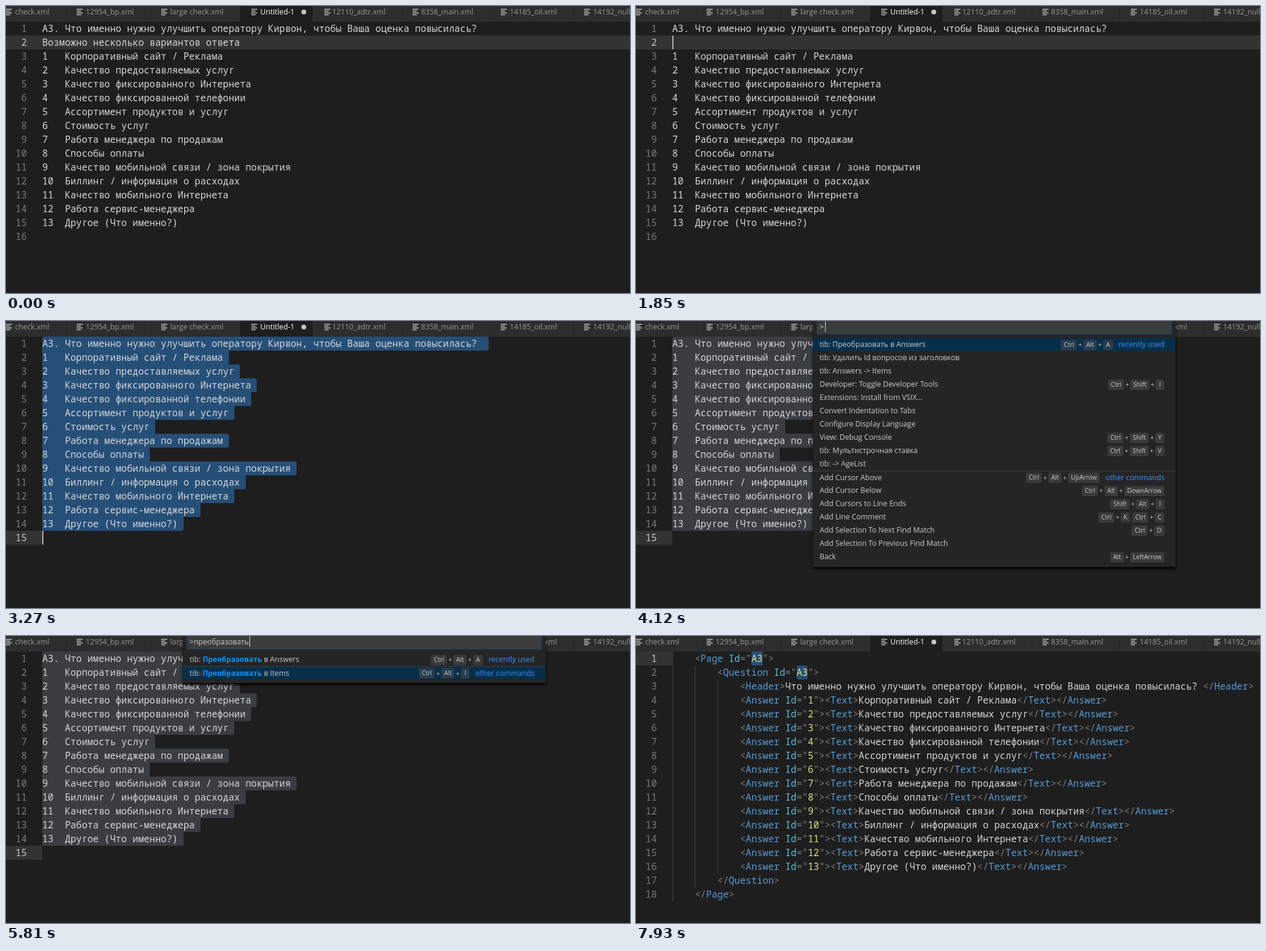
An HTML page for the animation above (8 s loop, 1033 by 476 pixels).

```html
<!DOCTYPE html>
<html lang="ru">
<head>
<meta charset="utf-8">
<style>
html, body { margin: 0; width: 100%; height: 100%; overflow: hidden; background: #1e1e1e; }
#stage { position: relative; width: 1033px; height: 476px; overflow: hidden;
  font: 12.25px/20px "Open Sans", "Noto Sans", sans-serif; color: #ccc; }
#stage div { position: absolute; box-sizing: border-box; white-space: pre; }
.line, .num { font: 15.583px/23px "Noto Sans Mono", "DejaVu Sans Mono", monospace; color: #d8d8d8; }
#stage .num { color: #7a7a7a; text-align: right; }
#stage .num.on { color: #c6c6c6; }
.p { color: #808080; } .t { color: #569cd6; } .a { color: #5cbcd8; } .v { color: #e2e284; }
#stage .tab { background: #2d2d2d; }
#stage .tab.on { background: #1e1e1e; }
svg { position: absolute; fill: none; stroke: #c0c0c0; stroke-width: 1.4; }
.palette { background: #252526; box-shadow: 0 3px 4px #000; }
.input { background: #3c3c3c; border: 1px solid #14476b; border-top: 0; }
#stage .row { left: 0; width: 600px; height: 22px; line-height: 22px; padding: 0 18px 0 11px;
  display: flex; align-items: center; }
.row.on { background: #062f4a; }
.row.split { border-top: 1px solid #3f3f46; }
.row b { color: #0097fb; }
.row span { flex: 1; }
.row em { font-style: normal; color: #3794ff; margin-left: 9px; }
.row i { font: 10.4px "Open Sans", sans-serif; margin: 0 2px; }
.row u { width: 3px; }
kbd { font: 10.4px/15px "Open Sans", "Noto Sans", sans-serif; padding: 0 4px; min-width: 5px; text-align: center;
  background: #3a3a3b; border: 1px solid #333; border-bottom-color: #444; border-radius: 3px; }
.row.on kbd { background: #263d4f; }
</style>
</head>
<body>
<div id="stage"></div>
<script type="module">
const X = 60, Y = 26, CW = 9.35, LH = 23;
const title = 'Что именно нужно улучшить оператору Кирвон, чтобы Ваша оценка повысилась? ';
const answers = ['Корпоративный сайт / Реклама', 'Качество предоставляемых услуг',
  'Качество фиксированного Интернета', 'Качество фиксированной телефонии',
  'Ассортимент продуктов и услуг', 'Стоимость услуг', 'Работа менеджера по продажам',
  'Способы оплаты', 'Качество мобильной связи / зона покрытия',
  'Биллинг / информация о расходах', 'Качество мобильного Интернета',
  'Работа сервис-менеджера', 'Другое (Что именно?)'];
const hint = 'Возможно несколько вариантов ответа';
const list = answers.map((a, i) => String(i + 1).padEnd(4) + a);
const head = 'A3. ' + title;
const fullDoc = [head, hint, ...list, ''];
const blankDoc = [head, '', ...list, ''];
const cleanDoc = [head, ...list, ''];

const esc = s => s.replace(/</g, '&lt;').replace(/>/g, '&gt;');
const tint = (cls, s) => `<span class="${cls}">${esc(s)}</span>`;
const openTag = (name, id) => tint('p', '<') + tint('t', name) +
  (id ? ' ' + tint('a', 'Id') + tint('p', '="') + tint('v', id) + tint('p', '"') : '') + tint('p', '>');
const closeTag = name => tint('p', '</') + tint('t', name) + tint('p', '>');
const indent = n => ' '.repeat(4 * n);
const xmlDoc = [
  indent(1) + openTag('Page', 'A3'),
  indent(2) + openTag('Question', 'A3'),
  indent(3) + openTag('Header') + title + closeTag('Header'),
  ...answers.map((a, i) => indent(3) + openTag('Answer', String(i + 1)) +
    openTag('Text') + a + closeTag('Text') + closeTag('Answer')),
  indent(2) + closeTag('Question'),
  indent(1) + closeTag('Page')];

const box = (x, y, w, h, style = '', inner = '', cls = '') =>
  `<div class="${cls}" style="left:${x}px;top:${y}px;width:${w}px;height:${h}px;${style}">${inner}</div>`;
const fill = (x, y, w, h, color, radius = 0) =>
  box(x, y, w, h, `background:${color};border-radius:${radius}`);
const rowTop = row => Y + row * LH;

// Tabs: left edge, right edge, icon x, label x, label
const tabs = [[0, 99, 0, 15, 'check.xml'], [100, 239, 117, 132, '12954_bp.xml'],
  [240, 387, 257, 272, 'large check.xml'], [388, 507, 406, 421, 'Untitled-1'],
  [508, 655, 527, 540, '12110_adtr.xml'], [656, 800, 673, 687, '8358_main.xml'],
  [801, 939, 819, 834, '14185_oil.xml'], [940, 1033, 957, 972, '14192_null.xml']];
const tabBar = fill(0, 0, 1033, Y, '#252526') + tabs.map(([l, r, icon, x, name], i) =>
  box(l, 0, r - l, Y, '', '', i == 3 ? 'tab on' : 'tab') +
  `<svg style="left:${icon}px;top:4px" width="10" height="12"><path d="M0 1.5h10M0 4.5h7M0 7.5h10M0 10.5h7"/></svg>` +
  box(x, 0, 120, 20, `color:${i == 3 ? '#fff' : '#999'}`, name)).join('') +
  fill(489, 6, 8, 8, '#c5c5c5', '50%');

// Selections are [row, first column, last column]; carets are [row, column].
function editor({ doc, row, sel = [], carets = [], blur, guides }) {
  let out = fill(0, rowTop(row), sel.length ? X : 1033, LH, '#333');
  if (guides) for (let i = 0; i < 3; i++)
    out += fill(Math.round(X + i * 4 * CW), rowTop(i), 1, (18 - 2 * i) * LH, '#404040');
  sel.forEach(([r, from, to], i) => {
    const end = j => sel[j] ? sel[j][2] : 0;
    const tr = end(i - 1) < to ? 3 : 0, br = end(i + 1) < to ? 3 : 0;
    const tl = sel[i - 1] ? 0 : 3, bl = sel[i + 1] ? 0 : 3;
    const radius = guides ? '3px' : `${tl}px ${tr}px ${br}px ${bl}px`;
    out += fill(X + from * CW, rowTop(r), (to - from) * CW, LH, blur ? '#3a3d41' : '#264f78', radius);
  });
  doc.forEach((text, i) => {
    out += box(0, rowTop(i), 34.5, LH, '', i + 1, i == row ? 'num on' : 'num') +
      box(X, rowTop(i), 1100, LH, '', text, 'line');
  });
  return out + carets.map(([r, c]) => fill(Math.floor(X + c * CW), rowTop(r), 2, LH, '#aeafad')).join('');
}

const keyCaps = keys => keys.split(' ').map(chord =>
  chord.split('+').map(k => `<kbd>${k}</kbd>`).join('<i>+</i>')).join('<u></u>');
const commands = [['tib: Преобразовать в Answers', 'Ctrl+Alt+A', 'recently used'],
  ['tib: Удалить Id вопросов из заголовков'], ['tib: Answers -> Items'],
  ['Developer: Toggle Developer Tools', 'Ctrl+Shift+I'], ['Extensions: Install from VSIX...'],
  ['Convert Indentation to Tabs'], ['Configure Display Language'],
  ['View: Debug Console', 'Ctrl+Shift+Y'], ['tib: Мультистрочная ставка', 'Ctrl+Shift+V'],
  ['tib: -> AgeList'], ['Add Cursor Above', 'Ctrl+Alt+UpArrow', 'other commands'],
  ['Add Cursor Below', 'Ctrl+Alt+DownArrow'], ['Add Cursors to Line Ends', 'Shift+Alt+I'],
  ['Add Line Comment', 'Ctrl+K Ctrl+C'], ['Add Selection To Next Find Match', 'Ctrl+D'],
  ['Add Selection To Previous Find Match'], ['Back', 'Alt+LeftArrow']];
const matches = [commands[0], ['tib: Преобразовать в Items', 'Ctrl+Alt+I', 'other commands']];

function palette({ query = '', caret, focus = 0, slider }) {
  const rows = query ? matches : commands;
  const items = rows.map(([name, keys, note], i) => {
    const label = query ? name.replace('Преобразовать', '<b>$&</b>') : esc(name);
    const cls = 'row' + (i == focus ? ' on' : '') + (note == 'other commands' ? ' split' : '');
    return `<div class="${cls}" style="top:${28 + 22 * i}px"><span>${label}</span>` +
      (keys ? keyCaps(keys) : '') + (note ? `<em>${note}</em>` : '') + '</div>';
  }).join('');
  return box(293, 0, 600, 34 + 22 * rows.length, '',
    box(6, 0, 588, 22, '', '', 'input') + box(11, 0, 300, 20, '', '&gt;' + query) + items +
    (caret ? fill(query ? 110 : 20, 1, 1, 17, '#ddd') : '') +
    (slider ? fill(590, 28, 10, 20, '#79797966') : ''), 'palette');
}

const allSelected = cleanDoc.slice(0, -1).map((s, i) => [i, 0, s.length + 1]);
const hintSelected = { doc: fullDoc, row: 1, sel: [[1, 0, hint.length]] };
const selected = { doc: cleanDoc, row: 14, sel: allSelected };
const converted = { doc: xmlDoc, row: 0, sel: [[0, 14, 16], [1, 22, 24]], guides: true };
const withCaret = (state, ...carets) => editor({ ...state, carets });
const search = options => editor({ ...selected, blur: true }) + palette(options);
const query = 'преобразовать';

const scenes = [
  [0, editor({ doc: fullDoc, row: 1 })],
  [430, withCaret({ doc: fullDoc, row: 1 }, [1, hint.length])],
  [990, withCaret(hintSelected, [1, 0])],
  [1420, editor(hintSelected)],
  [1850, withCaret({ doc: blankDoc, row: 1 }, [1, 0])],
  [2280, withCaret({ doc: cleanDoc, row: 0 }, [0, head.length])],
  [2710, editor({ doc: cleanDoc, row: 0 })],
  [3270, withCaret(selected, [14, 0])],
  [3710, editor(selected)],
  [4120, search({ caret: true })],
  [4540, search({ slider: true })],
  [4820, search({ query, caret: true })],
  [5250, search({ query, focus: 1 })],
  [5810, search({ query, focus: 1, caret: true })],
  [6090, search({ query, caret: true })],
  [6240, search({ query })],
  [6670, search({ query, caret: true })],
  [7230, search({ query })],
  [7370, withCaret(selected, [14, 0])],
  [7500, withCaret(converted, [0, 16], [1, 24])],
  [7930, editor(converted)]];

const stage = document.getElementById('stage');
const start = performance.now();
let shown;
function frame() {
  const t = (performance.now() - start) % 8000;
  const scene = scenes.filter(([from]) => from <= t).pop();
  if (scene != shown) {
    shown = scene;
    stage.innerHTML = tabBar + scene[1];
  }
  requestAnimationFrame(frame);
}
frame();
</script>
</body>
</html>
```
